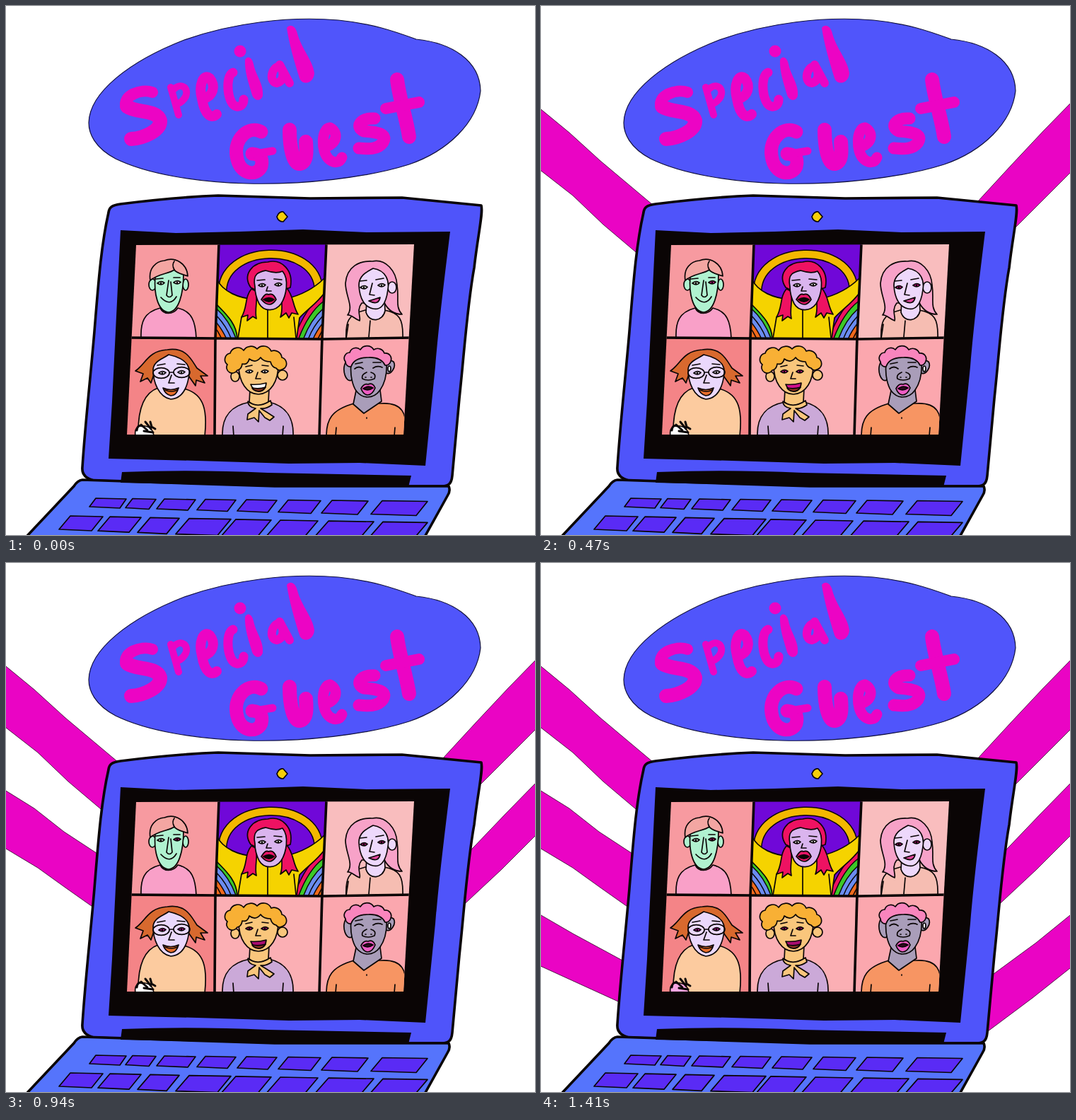
Animation of 748 by 748 pixels, one loop 1.88 s. Source, as an HTML page:

```html
<!DOCTYPE html>
<html lang="en">
<head>
<meta charset="utf-8">
<title>Special Guest</title>
<style>
  html, body { margin: 0; width: 100%; height: 100%; overflow: hidden; background: #fff; }
  svg { display: block; width: 100vw; height: 100vh; }
  .ink { stroke: #0a0505; stroke-width: 1.7; stroke-linejoin: round; stroke-linecap: round; fill: none; }
  .bold { stroke-width: 3.6; }
  .letters { stroke: #ec04c4; fill: none; stroke-linecap: round; stroke-linejoin: round; }
  .blob { fill: #ec04c4; stroke: none; }
  .ray { fill: #ea04c4; stroke: #300028; stroke-width: .8; }
  .second, .third, .fourth, .blink, .late, .hand { animation: 1880ms step-end infinite; }
  .second { animation-name: second; }
  .third { animation-name: third; }
  .fourth { animation-name: fourth; }
  .blink { animation-name: blink; }
  .late { animation-name: late; }
  .hand { animation-name: hand; }
  @keyframes second { 0% { visibility: hidden } 25%, 100% { visibility: visible } }
  @keyframes third { 0% { visibility: hidden } 50%, 100% { visibility: visible } }
  @keyframes fourth { 0% { visibility: hidden } 75%, 100% { visibility: visible } }
  @keyframes blink { 0% { fill: #fff } 25% { fill: #d0108c } 50%, 100% { fill: #a80c70 } }
  @keyframes late { 0% { fill: #f4ecff } 50%, 100% { fill: #c0189a } }
  @keyframes hand { 0% { fill: #fff } 75%, 100% { fill: #f7a6e2 } }
</style>
</head>
<body>
<svg viewBox="0 0 748 748" role="img" aria-label="Special Guest">
  <defs>
    <g id="eye"><path d="M-5 0Q0-4.5 5-.5Q1 4-5 0Z"/><circle r="1.2" fill="#0a0505" stroke="none"/></g>
    <clipPath id="screen"><path d="M184 338L577 337L562 606L171 606Z"/></clipPath>
    <clipPath id="guestTile"><path d="M301 338H453L447 470H297Z"/></clipPath>
  </defs>

  <g class="ray second">
    <path d="M-5 142L40 179L84 219L165 287L140 353L88 309L45 268L-5 229Z"/>
    <path d="M753 133L710 177L664 226L605 290L660 324L700 284L753 231Z"/>
  </g>
  <g class="ray third">
    <path d="M-5 319L40 347L82 380L140 418L135 495L84 459L45 431L-5 401Z"/>
    <path d="M753 307L706 355L640 424L640 490L700 434L753 381Z"/>
  </g>
  <g class="ray fourth">
    <path d="M-5 495L45 524L130 570L120 625L52 594L-5 568Z"/>
    <path d="M753 494L700 537L625 592L620 671L695 615L753 569Z"/>
  </g>

  <path fill="#5055fb" stroke="#10103c" stroke-width="1.2" d="M117 165C118 122 175 78 252 48C320 24 400 14 470 20C520 25 552 37 580 47C630 52 670 77 671 120C666 165 625 205 570 224C510 243 420 253 340 251C270 249 200 238 155 216C125 200 117 180 117 165Z"/>

  <g class="letters">
    <path stroke-width="16" d="M207 122C190 116 164 128 170 142C176 153 213 144 219 160"/>
    <path stroke-width="20" d="M171 142C185 152 214 146 218 162C219 176 195 187 177 188"/>
    <path stroke-width="10" d="M233 115L244 154M235 120C247 106 259 116 254 128C250 135 246 138 240 139"/>
    <path stroke-width="14" d="M279 131C293 128 297 113 288 102C279 95 272 112 277 131C281 155 291 160 298 153"/>
    <path stroke-width="13" d="M321 94C309 99 313 140 326 142C332 143 336 139 336 132"/>
    <path class="blob" d="M338 76C342 69 348 73 350 82C353 98 365 111 363 127C360 136 351 134 348 126C343 109 337 92 338 76Z"/>
    <circle class="blob" cx="331" cy="64" r="8.5"/>
    <path stroke-width="12" d="M387 85C374 87 372 108 383 109C393 106 394 95 387 83L401 109"/>
    <path class="blob" d="M397 31C402 24 410 29 412 39C418 61 434 77 436 95C435 110 419 113 415 102C408 80 400 52 397 31Z"/>
    <path stroke-width="19" d="M361 178C344 168 322 187 326 212C330 240 355 241 361 227C364 215 360 210 348 209"/>
    <path stroke-width="11" d="M346 210L377 205"/>
    <path stroke-width="20" d="M401 175C401 200 406 224 416 223C426 220 425 205 424 192"/>
    <path stroke-width="15" d="M453 199C469 193 470 178 458 172C446 173 445 205 456 216C463 223 472 222 475 214"/>
    <path stroke-width="17" d="M521 159C501 158 493 171 506 177C522 178 541 180 533 193C525 204 510 202 499 201"/>
    <path stroke-width="20" d="M553 104C556 130 566 158 570 185"/>
    <path stroke-width="16" d="M537 145L584 136"/>
  </g>

  <g class="ink bold">
    <path fill="#4f54fa" d="M145 292C146 284 150 282 162 280C210 274 250 270 300 268L430 272L560 271L672 282C675 292 667 325 662 370C652 425 648 490 641 555L631 664C630 676 626 680 610 679L380 680L124 671C112 668 107 662 108 652C112 590 120 520 125 460C130 400 134 340 145 292Z"/>
    <path fill="#5574fc" d="M108 670L380 679L626 679Q629 686 624 693L584 765L15 765L96 679Q101 671 108 670Z"/>
  </g>
  <path fill="#0a0505" d="M162 317L240 321L330 319L420 316L510 320L628 319C620 385 613 440 607 510L593 650L500 646L400 647L270 643L145 640L150 560Z"/>
  <path fill="#0a0505" d="M164 659Q260 655 370 660L573 664L569 680L380 679L162 674Z"/>
  <g class="ink">
    <path fill="#f6cf08" d="M383 298Q386 290 392 291L398 298L392 305Q385 305 383 298Z"/>
    <g id="keys" fill="#5a2bf5"></g>
  </g>

  <g class="ink" clip-path="url(#screen)">
    <g stroke="none">
      <path fill="#f79aa0" d="M180 335H301L297 470H175Z"/>
      <path fill="#7008d8" d="M301 335H453L447 470H297Z"/>
      <path fill="#f9bdbe" d="M453 335H580L570 470H447Z"/>
      <path fill="#f48487" d="M175 470H297L295 610H168Z"/>
      <path fill="#fbafb4" d="M297 470H445L443 610H295Z"/>
      <path fill="#fba7ae" d="M445 470H572L563 610H443Z"/>
    </g>

    <!-- green face -->
    <path fill="#f9a0c8" d="M191 470C190 447 195 433 218 427C223 437 236 437 243 427C263 432 268 446 269 470Z"/>
    <g fill="#b0f2d0">
      <ellipse cx="207" cy="394" rx="5" ry="8"/><ellipse cx="254" cy="394" rx="4" ry="8"/>
      <path d="M211 383C209 405 214 432 230 433C244 432 251 408 251 378C240 370 222 372 211 383Z"/>
    </g>
    <path fill="#f3a6a2" d="M204 388C201 371 212 361 224 360C239 354 256 364 257 382C249 379 241 378 238 373C230 379 216 378 204 388Z"/>
    <path d="M238 373Q234 366 238 361M230 388L227 409Q231 414 235 409L233 390M219 412Q232 426 241 411M212 386L222 385M237 384L246 384"/>
    <use href="#eye" x="219" y="392" fill="#d8ffe8"/><use href="#eye" x="242" y="391" class="blink"/>

    <!-- special guest -->
    <g clip-path="url(#guestTile)">
      <g id="rainbow"></g>
      <path style="stroke-width:13" d="M306 408C302 334 441 332 442 402"/>
      <path style="stroke-width:10;stroke:#f3b800" d="M306 408C302 334 441 332 442 402"/>
      <path fill="#f5d300" d="M298 386C307 405 330 413 352 415L396 414C421 408 437 398 450 385V406C440 420 425 430 415 441L411 470H327C326 447 307 432 297 421Z"/>
      <path d="M370 430V469M328 470L333 440M410 469L407 440"/>
      <g fill="#ee1262">
        <path d="M346 398C334 380 348 362 370 362C390 357 407 374 402 398L394 401H352Z"/>
        <path d="M347 400C337 412 342 425 333 440L342 437L341 445L349 439L354 442C351 428 357 414 353 403Z"/>
        <path d="M392 402C387 415 393 427 388 440L396 434L400 441L404 434L413 436C405 424 407 410 397 399Z"/>
      </g>
      <path fill="#dab4ee" d="M352 397C348 378 358 376 367 374Q382 379 391 375C401 387 396 410 389 421C381 432 365 433 358 421Q352 409 352 397Z"/>
      <path fill="#e81668" d="M361 415Q367 405 371 408Q378 405 382 415Q373 429 361 415Z"/>
      <path fill="#0a0505" d="M364 415Q372 410 379 415Q372 421 364 415Z"/>
      <path d="M370 397L368 403L375 403M355 388L366 387M379 386L390 387"/>
      <g fill="#fff"><use href="#eye" x="362" y="395"/><use href="#eye" x="385" y="394"/></g>
    </g>

    <!-- pink hair -->
    <path fill="#f6bdb2" d="M481 470C480 447 483 436 508 430L535 430C556 434 562 442 561 470Z"/>
    <path fill="#f7a2c8" d="M483 437C492 425 480 410 480 392C482 368 500 360 518 361C537 357 552 375 553 395C556 415 550 425 560 436C548 436 540 429 535 420L503 420C495 430 502 440 500 445C492 442 488 436 483 437Z"/>
    <g fill="#edd8fb">
      <path d="M510 418L509 433C514 449 533 446 536 431L535 414Z"/>
      <ellipse cx="546" cy="398" rx="6" ry="8"/>
      <path d="M499 395C499 381 510 376 519 371C538 374 542 389 540 401C537 425 528 430 519 428C508 426 500 415 499 395Z"/>
    </g>
    <path d="M518 392L514 408L521 409M500 389L510 388M523 387L534 385M515 445L513 468M481 470L484 450"/>
    <path fill="#e0489c" d="M513 417Q520 415 529 412Q527 424 513 417Z"/>
    <g class="blink"><use href="#eye" x="506" y="398"/><use href="#eye" x="531" y="395"/></g>

    <!-- glasses -->
    <path fill="#fccb9f" d="M187 608C186 570 195 547 215 540L255 542C280 550 285 572 281 608Z"/>
    <path fill="#d8692e" d="M190 531L194 520L183 516C198 506 200 488 228 486C255 482 262 500 270 512L285 523L275 523L281 533L269 529L268 537L256 520L210 518L205 533L200 526Z"/>
    <path fill="#ead8fc" d="M208 514C209 502 220 500 230 493C248 497 261 505 259 520C256 546 245 555 233 556C216 553 208 532 208 514Z"/>
    <g class="late"><use href="#eye" x="221" y="519"/><use href="#eye" x="248" y="518"/></g>
    <path d="M208 519A11 7 0 0 1 231 519A11 7 0 0 1 208 519ZM237 518A11 7 0 0 1 260 518A11 7 0 0 1 237 518ZM231 518L237 518M234 522L230 533L238 533M214 508L225 506M242 506L253 507"/>
    <path fill="#e86e2c" d="M222 540Q233 545 244 540Q241 551 233 551Q225 549 222 540Z"/>
    <path d="M225 543Q234 547 242 543"/>
    <path class="hand" d="M183 608C181 596 188 592 197 594Q208 596 209 608Z"/>
    <path style="stroke-width:3" d="M185 600Q186 591 193 594M191 592L200 600M197 588L205 598M204 588L206 595L211 598M195 601L208 603"/>

    <!-- curls -->
    <path fill="#cba9d8" d="M306 608C305 580 318 565 345 560H372C398 566 407 585 406 608Z"/>
    <path d="M322 608L321 594M391 608L392 594"/>
    <g fill="#f9c67c">
      <path d="M345 542L344 560Q357 571 371 560L372 540Z"/>
      <ellipse cx="324" cy="524" rx="6" ry="7"/><ellipse cx="391" cy="522" rx="7" ry="7"/>
      <path d="M329 508C329 532 341 549 357 549C375 548 385 530 385 507C371 490 341 490 329 508Z"/>
      <path d="M342 559Q356 570 374 558L376 564Q368 570 360 569Q370 575 379 581L373 586L366 582L358 572L357 588L351 582L341 585L342 577L353 569Q342 567 342 559Z"/>
    </g>
    <path fill="#f8b035" d="M327 515A8 8 0 0 1 313 507A9 9 0 0 1 317 491A11 11 0 0 1 336 487A12 12 0 0 1 355 485A12 12 0 0 1 375 488A11 11 0 0 1 390 497A9 9 0 0 1 394 512Q386 518 382 512Q376 511 374 503Q364 503 360 497Q353 506 344 499Q342 508 334 506Q333 514 327 515Z"/>
    <path d="M356 518L353 527L360 527M339 510L348 508M362 508L371 509"/>
    <path class="blink" d="M346 535Q357 536 368 533Q367 545 357 545Q349 543 346 535Z"/>
    <path fill="#8c3424" d="M348 540Q358 542 367 539Q363 545 357 545Q350 544 348 540Z"/>
    <g class="blink"><use href="#eye" x="344" y="517"/><use href="#eye" x="366" y="517"/></g>

    <!-- orange shirt -->
    <path fill="#f79563" d="M453 608C453 585 460 571 492 562H530C560 560 568 575 565 608Z"/>
    <path d="M466 608L467 596M549 608L550 596M510 582V583"/>
    <g fill="#a99db9">
      <path d="M489 529C480 533 475 515 480 504Q487 499 490 509ZM537 519C545 522 552 510 548 503Q540 498 537 507Z"/>
      <path d="M488 505C486 524 491 538 495 544L491 563L506 576L531 559L529 543C536 533 539 520 538 504C530 490 495 490 488 505Z"/>
      <path d="M495 544Q502 553 511 553Q522 553 529 543"/>
    </g>
    <ellipse cx="542" cy="513" rx="2" ry="4" fill="#fff"/>
    <path fill="#f985bd" d="M480 503A8 8 0 0 1 486 490A9 9 0 0 1 501 486A11 11 0 0 1 520 486A10 10 0 0 1 535 491A8 8 0 0 1 544 502A7 7 0 0 1 536 508Q530 496 512 497Q492 497 488 510A7 7 0 0 1 480 503Z"/>
    <path d="M493 513Q499 508 505 513M519 512Q525 508 532 511M494 506L504 504M519 504L530 504M510 518Q502 521 504 527Q512 531 521 527Q524 520 516 518M508 525H509M516 525H517"/>
    <path fill="#ee5cc4" d="M502 541Q506 533 512 535Q519 532 522 540Q518 550 511 550Q505 549 502 541Z"/>
    <path fill="#300820" d="M505 541Q512 536 519 540Q512 545 505 541Z"/>

    <path class="bold" d="M301 336L296 470L295 608M453 336L447 470L443 608M174 469L298 470L450 471L575 469"/>
  </g>
</svg>
<script>
  const NS = "http://www.w3.org/2000/svg";
  const addPath = (parent, d, style = "") => {
    const path = document.createElementNS(NS, "path");
    path.setAttribute("d", d);
    path.style.cssText = style;
    parent.append(path);
  };

  // One keyboard row: slanted keys that sink and grow slightly to the right.
  const keys = document.getElementById("keys");
  const addRow = (lefts, rights, top, slope, height, slant) => lefts.forEach((left, i) => {
    const right = rights[i], y = top + i * slope, h = height + i;
    addPath(keys, `M${left + slant + i} ${y}L${right} ${y + 1}L${right - slant - i} ${y + h}L${left} ${y + h - 2}Z`);
  });
  addRow([118, 169, 213, 270, 327, 385, 446, 516], [170, 212, 268, 325, 383, 445, 512, 596], 696, .5, 14, 9);
  addRow([75, 130, 186, 240, 305, 367, 434, 510], [137, 191, 245, 318, 375, 441, 520, 596], 721, 1.2, 21, 16);

  // Mirrored rainbow arcs that fall from the tile's edges to its floor.
  const rainbow = document.getElementById("rainbow");
  const bands = ["#ee1262", "#3cc828", "#6a8cf0", "#6a8cf0", "#f06a1c", "#f06a1c"];
  for (const side of [-1, 1]) bands.forEach((color, i) => {
    const x = reach => 373 + side * reach;
    const y = 412 + i * 10;
    const d = `M${x(78)} ${y}Q${x(54 + i * 3)} ${y + 16} ${x(36 + i * 7)} 478`;
    addPath(rainbow, d, "stroke-width:11");
    addPath(rainbow, d, `stroke-width:8;stroke:${color}`);
  });
</script>
</body>
</html>
```
